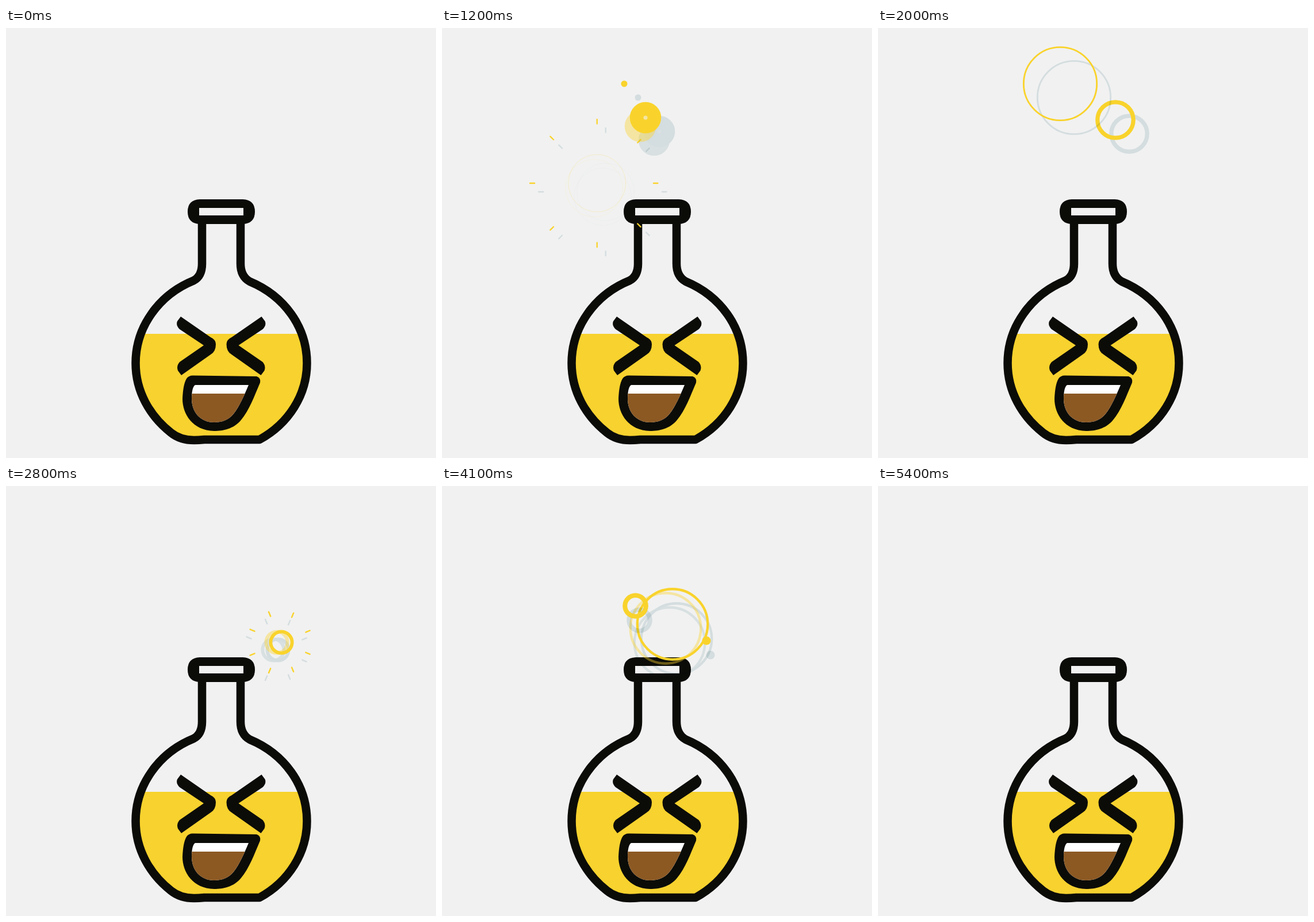
An HTML page for the animation above (5.5 s loop, 748 by 748 pixels).

```html
<!DOCTYPE html>
<html lang="en">
<head>
<meta charset="utf-8">
<title>Laughing flask</title>
<style>
html, body { margin: 0; width: 100%; height: 100%; overflow: hidden; background: #f1f1f1; }
svg { display: block; width: 100%; height: 100%; }
.shade { mix-blend-mode: multiply; }
</style>
</head>
<body>
<svg viewBox="0 0 748 748">
  <defs>
    <clipPath id="low"><rect y="532" width="748" height="216"/></clipPath>
    <clipPath id="drink"><rect y="636" width="748" height="112"/></clipPath>
    <path id="glass" d="M341 334V410Q341 432 326 439.500C266 464 225.500 520 225.500 583C225.500 632 250 675 287 704Q303 717 327 717Q335 717 345 716H441C492 688 523.500 638 523.500 583C523.500 520 484 466 424 441Q408 432 408 410V334"/>
    <path id="eye" d="M304 502L356 538Q365 542 365 550Q365 563 356 568L305 604L299 596Q296 588 302 581L344 552L302 524Q295 517 298 510Z"/>
    <path id="tongue" d="M329 621H422C414 640 406 658 396 671Q384 686 362 686C338 686 323 668 323 645Q323 625 329 621Z"/>
  </defs>
  <rect width="748" height="748" fill="#f1f1f1"/>
  <use href="#glass" fill="#f8d22e" clip-path="url(#low)"/>
  <use href="#glass" fill="none" stroke="#0b0c08" stroke-width="14.500" stroke-linejoin="round"/>
  <g fill="#0b0c08">
    <path fill-rule="evenodd" d="M337 298H412Q433 299 433 319.500T412 341H337Q316 340 316 319.500T337 298ZM336 313V326H413V313Z"/>
    <use href="#eye"/>
    <use href="#eye" transform="translate(748.500) scale(-1 1)"/>
    <path d="M326 604.500L436 606Q444 609 442 617C432 640 424 664 408 683C396 697 378 701 362 701C325 700 307 672 307 645Q308 620 314 610Q318 604 326 604.500Z"/>
  </g>
  <use href="#tongue" fill="#fff"/>
  <use href="#tongue" fill="#8c5923" clip-path="url(#drink)"/>
  <g id="fx" fill="none" stroke-linecap="round"></g>
</svg>
<script>
const LOOP = 5500, STEP = 100, RAYS = 8;
const YELLOW = '#f9d32c', SHADE = '#e1eaec', SOFT = '#e5edee';
const fx = document.getElementById('fx');

const sineOut = p => Math.sin(p * Math.PI / 2);
const sineInOut = p => (1 - Math.cos(p * Math.PI)) / 2;
const cubicOut = p => 1 - (1 - p) ** 3;

const circle = (x, y, r, w, color, extra = '') => r < w / 2
  ? `<circle cx="${x}" cy="${y}" r="${r + w / 2}" fill="${color}" ${extra}/>`
  : `<circle cx="${x}" cy="${y}" r="${r}" stroke="${color}" stroke-width="${w}" ${extra}/>`;

const shade = (drop, body) =>
  `<g class="shade" transform="translate(${drop})">${body}</g>`;

// A thick ring that opens fast and thins out, with a pale echo beside it.
function puff(x, y, start, life, size, weight, drop, echo) {
  return t => {
    const p = (t - start) / life;
    if (p <= 0 || p >= 1) return '';
    const r = size * sineOut(p), w = weight * (1 - p);
    const main = color => circle(x, y, r, w, color);
    const pale = (color, extra) =>
      circle(x + echo[0], y + echo[1], r, w, color, extra);
    return shade(drop, pale(SOFT) + main(SHADE)) +
      pale(YELLOW, 'opacity=".4"') + main(YELLOW);
  };
}

// A dot that swells into a thin ring.
function bubble(x, y, start, size, drop) {
  return t => {
    const p = (t - start) / 1000;
    if (p <= 0 || p >= 1) return '';
    const ring = color =>
      circle(x, y, size * sineInOut(p), 9 * (1 - p ** 3), color);
    return shade(drop, ring(SHADE)) + ring(YELLOW);
  };
}

// Short rays flying outwards, a little further to the left.
function spray(x, y, start, size, turn, drop) {
  return t => {
    const age = t - start;
    if (age <= 0 || age >= 1500) return '';
    const p = Math.min(1, age / 1430);
    const tip = cubicOut(p);
    const tail = Math.max(0, tip - 0.12 * Math.sin(p * Math.PI));
    let d = '';
    for (let i = 0; i < RAYS; i++) {
      const a = (i + turn) * 2 * Math.PI / RAYS;
      const len = size * (1 - 0.05 * Math.cos(a));
      const at = k => `${x + len * k * Math.cos(a)} ${y + len * k * Math.sin(a)}`;
      d += `M${at(tail)}L${at(tip)}`;
    }
    const rays = color =>
      `<path d="${d}" stroke="${color}" stroke-width="${size * 0.03 * (1.5 - p)}"/>`;
    return shade(drop, rays(SHADE)) + rays(YELLOW);
  };
}

// Rays with a ring that follows a moment later.
const flare = (x, y, start, size, turn, drop, echo) => [
  spray(x, y, start, size, turn, drop),
  puff(x, y, start + 165, 1000, size * 0.446, size * 0.13, drop, echo)
];

const NEAR = [15, 15], FAR = [24, 24], LEFT = [-6, 13], DOWN = [7, 25];
const parts = [
  ...flare(269.7, 270, 50, 112, 0, NEAR, [-5, 8.5]),
  puff(354, 156, 1105, 770, 80, 27, FAR, [-9, 15]),
  bubble(413, 160, 1420, 50, FAR),
  bubble(317, 97, 1120, 66, FAR),
  ...flare(479, 272, 2250, 73.5, 0.5, LEFT, [-8, 0]),
  puff(401, 240.5, 3550, 770, 68, 15, DOWN, [-12, 7]),
  bubble(336.5, 208.5, 3620, 39, DOWN),
  bubble(460, 269, 3920, 40, DOWN),
  puff(488, 285, 4550, 770, 24, 7, DOWN, [-11, 6])
];

const begin = performance.now();
let last = -1;
function tick() {
  const t = Math.floor((performance.now() - begin) % LOOP / STEP) * STEP;
  if (t !== last) {
    last = t;
    fx.innerHTML = parts.map(part => part(t)).join('');
  }
  requestAnimationFrame(tick);
}
tick();
</script>
</body>
</html>
```
